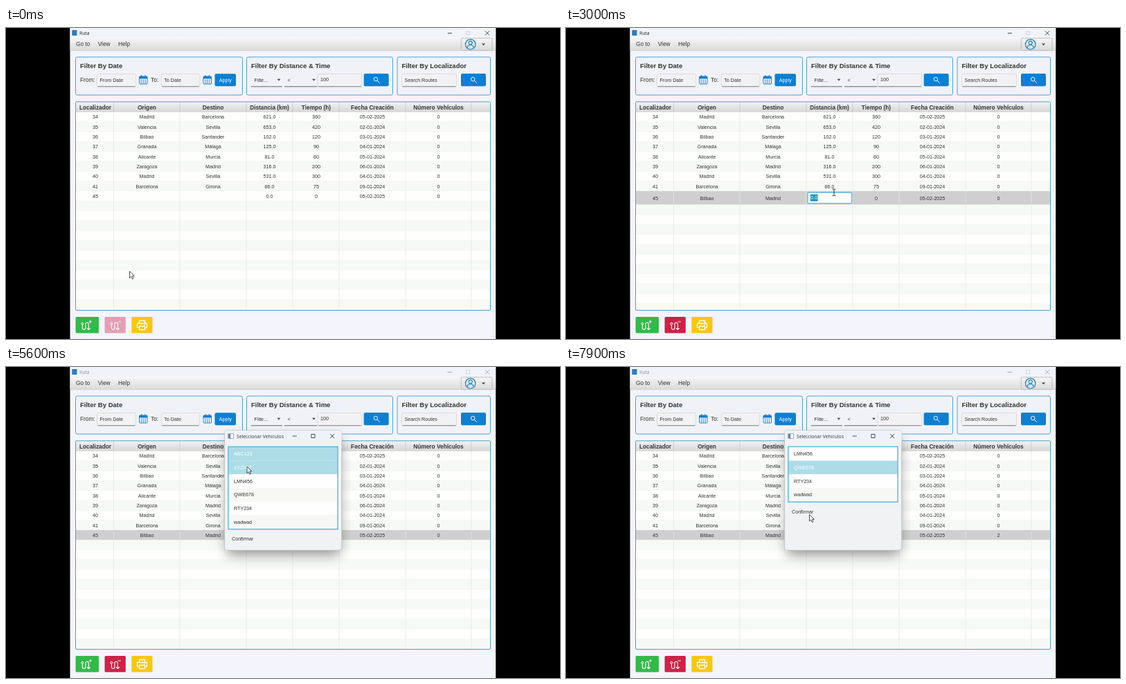
These frames come from a looping animation (800x450 px, 8000 ms). An HTML page:

```html
<!DOCTYPE html>
<html lang="es">
<head>
<meta charset="utf-8">
<title>Ruta</title>
<style>
  html, body { margin: 0; width: 100%; height: 100%; overflow: hidden; background: #000; }
  svg { display: block; width: 800px; height: 450px; }
  text { font: 7.15px "Liberation Sans", Arial, sans-serif; fill: #333; }
  .menu { font-size: 8.3px; }
  .head { font-size: 8.3px; font-weight: bold; }
  .panel { font-size: 9.5px; font-weight: bold; }
  .title { font: 6.8px "Open Sans", "Noto Sans", sans-serif; }
  .mid { text-anchor: middle; }
  .light { fill: #fff; }
  .line { fill: none; stroke-linecap: round; stroke-linejoin: round; }
</style>
</head>
<body>
<svg viewBox="0 0 800 450" xmlns="http://www.w3.org/2000/svg">
  <defs>
    <linearGradient id="bar" x2="0" y2="1"><stop stop-color="#f6f6f6"/><stop offset="1" stop-color="#dadada"/></linearGradient>
    <linearGradient id="th" x2="0" y2="1"><stop stop-color="#f2f2f2"/><stop offset="1" stop-color="#d6d6d6"/></linearGradient>
    <filter id="shadow" x="-30%" y="-30%" width="160%" height="170%"><feGaussianBlur stdDeviation="9"/></filter>
    <clipPath id="body"><rect x="101" y="121" width="598" height="287"/></clipPath>
  </defs>
  <g id="base"></g>
  <g id="live"></g>
</svg>
<script>
const LOOP = 8000, STEP = 100;
const BLUE = '#107fd0', EDGE = '#4ba3cd';
const COLS = [101, 155.5, 251, 347, 414, 481, 577, 672, 699];
const MIDS = [129, 203.5, 299, 380.5, 448, 529, 624.5];
const HEADS = ['Localizador', 'Origen', 'Destino', 'Distancia (km)', 'Tiempo (h)', 'Fecha Creación', 'Número Vehículos'];
const ROWS = [
  '34,Madrid,Barcelona,621.0,360,05-02-2025,0',
  '35,Valencia,Sevilla,653.0,420,02-01-2024,0',
  '36,Bilbao,Santander,102.0,120,03-01-2024,0',
  '37,Granada,Málaga,125.0,90,04-01-2024,0',
  '38,Alicante,Murcia,81.0,60,05-01-2024,0',
  '39,Zaragoza,Madrid,316.0,200,06-01-2024,0',
  '40,Madrid,Sevilla,531.0,300,04-01-2024,0',
  '41,Barcelona,Girona,86.0,75,09-01-2024,0'
].map(r => r.split(','));
const TOP = 121.6, PITCH = 14.31, TALL = 19.7, LAST = 8;

// Cell edits: open time, commit time, first key, old value, new value
const EDITS = [
  { col: 1, from: 400, to: 1200, first: 500, old: '', word: 'Bilbao' },
  { col: 2, from: 1400, to: 2200, first: 1500, old: '', word: 'Madrid' },
  { col: 3, from: 2800, to: 3600, first: 3200, old: '0.0', word: '700.0', keys: 3 },
  { col: 4, from: 4000, to: 4500, first: 4300, old: '0', word: '4' }
];
const PLATES = ['ABC123', 'XYZ987', 'LMN456', 'QWE678', 'RTY234', 'wadwad'];
const DIALOGS = [
  { open: 5100, close: 6200, items: PLATES, picks: [5400, 5600], press: 6100 },
  { open: 7100, close: 8200, items: PLATES.slice(2), picks: [Infinity, 7600], press: 8100 }
];
const FADE = 160;
// Pointer path: time, x, y
const PATH = [
  [0, 178.5, 352], [300, 207, 243], [700, 208, 239], [1100, 212, 241], [1400, 321, 243],
  [1800, 322.5, 243], [2300, 324, 242], [2700, 386, 239], [3000, 387, 238], [3600, 389, 240],
  [3900, 447, 242], [4500, 450, 243], [4900, 613, 239], [5100, 613, 239], [5400, 347, 124],
  [5600, 348, 144], [6000, 347, 247], [6400, 347, 247], [6900, 614, 240], [7200, 614, 240],
  [7600, 350, 144], [7900, 351.5, 213.5]
];

const rect = (x, y, w, h, fill, extra = '') => `<rect x="${x}" y="${y}" width="${w}" height="${h}" fill="${fill}" ${extra}/>`;
const text = (x, y, s, cls = '', extra = '') => `<text x="${x}" y="${y}" class="${cls}" ${extra}>${s.replace(/&/g, '&amp;').replace(/</g, '&lt;')}</text>`;
const line = (d, color, w = 1) => `<path class="line" d="${d}" stroke="${color}" stroke-width="${w}"/>`;
const disc = (x, y, r, color, w) => `<circle cx="${x}" cy="${y}" r="${r}" fill="none" stroke="${color}" stroke-width="${w}"/>`;
const arrow = (x, y) => `<path d="M${x - 2.5} ${y - 1.2}h5l-2.5 2.7z" fill="#444"/>`;
const panel = (x, w, s) => rect(x, 42, w, 55, '#f1f2f7', `rx="2.5" stroke="${EDGE}"`) + text(x + 6.5, 57.8, s, 'panel');
const field = (x, w, s) => rect(x, 66.5, w, 18, '#f2f2f4', 'rx="2" stroke="#d6d6d8" stroke-width=".8"')
  + line(`M${x + 1.5} 84.8h${w - 3}`, '#777', .9) + text(x + 4, 78, s);
const combo = (x, w, s) => line(`M${x} 84.8h${w}`, '#555', .9) + text(x + 4.3, 78, s) + arrow(x + w - 4.5, 75);
const finder = x => rect(x, 66, 36, 18.3, BLUE, 'rx="2"') + disc(x + 17.2, 74, 2.8, '#fff', .9) + line(`M${x + 19.4} 76.2l3.2 3.2`, '#fff', 1);

function calendar(x) {
  let s = rect(x, 70, 11.5, 11, '#fff', `rx="1" stroke="${BLUE}" stroke-width="1"`) + rect(x, 70, 11.5, 3.5, BLUE)
    + line(`M${x + 3} 68.7v2.4M${x + 8.5} 68.7v2.4`, BLUE, 1.2);
  for (let i = 0; i < 9; i++) s += rect(x + 2 + i % 3 * 2.9, 74.7 + (i / 3 | 0) * 2, 1.7, 1.2, BLUE);
  return s;
}

function route(x, plus) {
  return disc(x + 1.8, 427.8, 1.5, '#fff', 1)
    + line(`M${x + 1.8} 429.6V434a2.3 2.3 0 0 0 4.6 0V428.4a2.2 2.2 0 0 1 4.4 0V436.5m-2 -2l2 2l2 -2`, '#fff', 1.1)
    + line(`M${x + 11.5} 425h3.6` + (plus ? `m-1.8 -1.8v3.6` : ''), '#fff', .9);
}

function printer() {
  return line('M192.5 427.5v-4h8v4M192.5 433.5h-3v-6h14v6h-3M192.5 431.5h8v5h-8z', '#fff', 1.3) + rect(199.5, 429, 1.5, 1, '#fff');
}

function base() {
  let s = rect(92.5, 0, 614.7, 450, '#f4f4fc') + rect(92.5, 0, 614.7, 14, '#f0f4fa') + rect(92.5, 14, 614.7, 18.5, 'url(#bar)')
    + line('M93 32.7h613.7', '#c6c6c8', .7) + rect(95.3, 3, 7.2, 8, '#347cb4')
    + [[101, 'Go to'], [132.7, 'View'], [162, 'Help']].map(m => text(m[0], 25.8, m[1], 'menu')).join('');
  s += panel(100.5, 241, 'Filter By Date') + text(107, 78.2, 'From:', 'menu') + field(131.5, 56, 'From Date') + calendar(192.5)
    + text(209, 78.2, 'To:', 'menu') + field(224.3, 55.5, 'To Date') + calendar(285)
    + rect(301.5, 66.3, 30.5, 18, BLUE, 'rx="2"') + text(316.8, 78, 'Apply', 'mid light');
  s += panel(347.5, 211, 'Filter By Distance & Time') + combo(354.3, 44.2, 'Filte...') + combo(402.3, 46.7, '<')
    + field(450, 64, '100').replace('y="78"', 'y="77.3"') + finder(516.7);
  s += panel(565, 134.5, 'Filter By Localizador') + field(571.5, 79, 'Search Routes') + finder(657);
  s += rect(100.5, 418, 33.5, 23.6, '#35b84b', 'rx="1.5"') + route(108.5, true)
    + rect(181.3, 418, 30.2, 23.6, '#f8c614', 'rx="1.5"') + printer();
  return s;
}

const pen = document.createElement('canvas').getContext('2d');
pen.font = '7.15px "Liberation Sans", Arial, sans-serif';
const textWidth = s => pen.measureText(s).width;

function editor(e, t) {
  const x = COLS[e.col] + 2, w = COLS[e.col + 1] - x - 1.3, tx = x + 4.3;
  const count = Math.min(e.keys || e.word.length, Math.floor((t - e.first) / STEP) + 1);
  const typed = count > 0 ? e.word.slice(0, count) : e.old;
  const end = tx + textWidth(typed), marked = count < 1 && e.old;
  return rect(x, 238, w, 15.6, '#fff', 'rx="1.5" stroke="#60b5dc" stroke-width="1.3"')
    + (marked ? rect(tx - .4, 240.7, end - tx + .8, 10, '#1c8fbf') : '')
    + text(tx, 248.4, typed, marked ? 'light' : '')
    + (marked ? '' : line(`M${end + .5} 241.2v8.8`, '#222', .7));
}

function table(t, selected, focusFirst) {
  const edit = EDITS.find(e => t >= e.from && t < e.to);
  const last = ['45', '', '', '0.0', '0', '05-02-2025', t >= DIALOGS[0].close ? '2' : '0'];
  EDITS.forEach(e => { if (t >= e.to) last[e.col] = e.word; });
  if (edit) last[edit.col] = '';
  const data = [...ROWS, last];
  let s = rect(100.5, 106.8, 599, 301.7, '#fdfefc') + '<g clip-path="url(#body)">', y = TOP;
  for (let i = 0; i < 20; i++) {
    const h = i === LAST && edit ? TALL : PITCH;
    s += rect(101, y, 598, h, i === LAST && selected ? '#cfcfcf' : i % 2 ? '#f7f9f6' : '#fefefc')
      + line(`M101 ${y + h}h598`, '#ececec', .6);
    if (data[i]) s += data[i].map((v, c) => text(MIDS[c], y + h / 2 + 2.6, v, 'mid')).join('');
    y += h;
  }
  s += line(COLS.slice(1, 8).map(x => `M${x} 122V408`).join(''), '#e4e5e4', .7);
  if (focusFirst) s += rect(101.5, 122.2, 597, 13.2, 'none', 'stroke="#55a9cf" stroke-width="1"');
  s += '</g>' + rect(101, 107, 598, 14.8, 'url(#th)') + line(COLS.slice(1, 8).map(x => `M${x} 108V121.5`).join(''), '#c4c4c4', .7)
    + HEADS.map((v, c) => text(MIDS[c], 117.6, v, 'head mid')).join('');
  s += rect(100.5, 106.8, 599, 301.7, 'none', `rx="1.5" stroke="${focusFirst ? '#2f9fd0' : EDGE}" stroke-width="${focusFirst ? 1.4 : 1}"`);
  return s + (edit ? editor(edit, t) : '');
}

function frame(active, menuFocus) {
  const ink = active ? '#222' : '#929498';
  return text(106, 9.6, 'Ruta', 'title', `style="fill:${ink}"`)
    + line('M638 7.5h5.5', ink, .8) + rect(664.7, 4.8, 5, 5, 'none', 'stroke="#c8cacd" stroke-width=".7"')
    + line('M692.2 4.6l5.6 5.6m0 -5.6l-5.6 5.6', ink, .8)
    + rect(657.3, 14.8, 44.7, 17.6, 'url(#bar)', `rx="1.5" stroke="${menuFocus ? '#3fa3d2' : '#b9b9bb'}" stroke-width="${menuFocus ? 1.3 : .9}"`)
    + disc(670.7, 23.7, 7.3, '#1682c4', 1.2) + disc(670.7, 21.4, 2.5, '#1682c4', 1.1)
    + line('M666.2 28.8c0 -5.4 9 -5.4 9 0', '#1682c4', 1.1) + arrow(689.5, 23.8);
}

function dialog(d, t) {
  const shown = Math.min(1, (t - d.open + STEP / 2) / FADE);
  const gone = Math.max(0, (t - d.close) / FADE);
  if (gone >= 1) return '';
  const alpha = shown * (1 - gone), size = 1 - .08 * Math.max(1 - shown, gone);
  const rowH = 19.7, listH = d.items.length * rowH + 1.2, btnY = 115.3 + listH + 13.7;
  let s = rect(319, 104, 163, 168, '#000', 'rx="6" opacity=".42" filter="url(#shadow)"')
    + rect(315.6, 91.8, 169.2, 173.4, '#f1f2f4', 'rx="4" stroke="#b4b6ba" stroke-width=".7"')
    + `<path d="M316 108.5v-12.7q0 -3.7 3.7 -3.7h161q3.8 0 3.8 3.7v12.7z" fill="#eff3f9"/>`
    + rect(320.8, 96.5, 7.5, 7, '#fff', 'stroke="#777" stroke-width=".6"') + rect(321.2, 97, 3, 6, '#4a84a8')
    + text(333, 102.6, 'Seleccionar Vehículos', 'title')
    + line('M414 100h5.5M468.3 97.2l5.5 5.5m0 -5.5l-5.5 5.5', '#222', .8) + rect(441, 97.3, 5, 5, 'none', 'stroke="#222" stroke-width=".8"');
  d.items.forEach((v, i) => {
    const y = 115.9 + i * rowH, on = t >= d.picks[i];
    s += rect(321.5, y, 157, rowH, on ? '#addce7' : i % 2 ? '#f7f8f6' : '#fefefe') + text(329, y + 12.4, v, on ? 'light' : '');
  });
  s += rect(321, 115.3, 158, listH, 'none', 'stroke="#42add0" stroke-width="1.2"');
  if (t >= d.press) s += rect(322, btnY - 7.5, 38, 15, '#cfd0d2', 'rx="2"');
  s += text(326, btnY + 2.5, 'Confirmar');
  return `<g opacity="${alpha}" transform="translate(400 178.5) scale(${size}) translate(-400 -178.5)">${s}</g>`;
}

function pointer(t) {
  let i = PATH.findIndex(p => p[0] > t);
  if (i < 0) i = PATH.length - 1;
  const [t0, x0, y0] = PATH[i - 1], [t1, x1, y1] = PATH[i];
  const p = Math.min(1, (t - t0) / (t1 - t0)), k = p * p * (3 - 2 * p);
  const x = x0 + (x1 - x0) * k, y = y0 + (y1 - y0) * k;
  const beam = EDITS.some(e => t >= e.from && t < e.to && x > COLS[e.col] && x < COLS[e.col + 1]);
  return `<g transform="translate(${x} ${y})">` + (beam
    ? line('M-2 -4.7h1.3l.7 .6l.7 -.6h1.3M0 -4.1v8.2M-2 4.7h1.3l.7 -.6l.7 .6h1.3', '#222', .9)
    : '<path d="M0 0V9.6L2.2 7.5L3.9 11.2L5.6 10.4L4 6.9H6.9Z" fill="#fff" stroke="#222" stroke-width=".8" stroke-linejoin="round"/>') + '</g>';
}

function render(t) {
  const d = DIALOGS.find(d => t >= d.open && t < d.close + FADE);
  const active = !d || t >= d.close;
  const selected = t >= 300 && t < 6200 || t >= 6900;
  const remove = rect(142.5, 418, 30.3, 23.6, '#cc2246', 'rx="1.5"') + route(150.5, false);
  return frame(active, t >= 4500 && t < 5100) + table(t, selected, t >= 6200 && t < 6900)
    + `<g opacity="${selected ? 1 : .4}">${remove}</g>` + (d ? dialog(d, t) : '') + pointer(t);
}

document.getElementById('base').innerHTML = base();
const live = document.getElementById('live'), start = performance.now();
let shownAt = -1;
function tick() {
  const t = Math.floor((performance.now() - start) % LOOP / STEP) * STEP;
  if (t !== shownAt) live.innerHTML = render(shownAt = t);
  requestAnimationFrame(tick);
}
tick();
</script>
</body>
</html>
```
